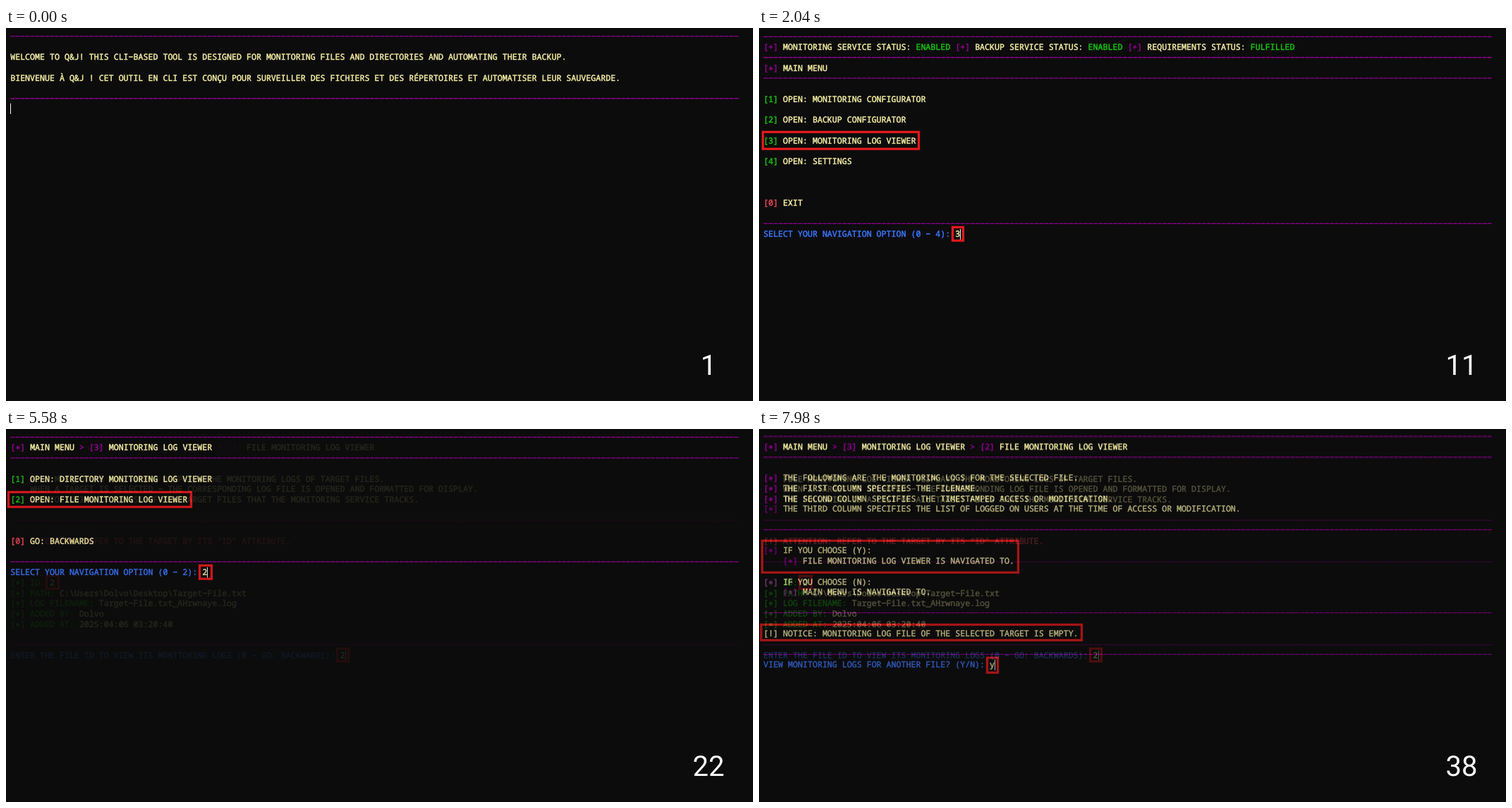
An HTML page that plays this animation: 1059x529 px, repeating every 8000 ms.

```html
<!DOCTYPE html>
<html lang="en">
<head>
<meta charset="utf-8">
<title>Terminal walkthrough</title>
<style>
  html, body { margin: 0; width: 100%; height: 100%; overflow: hidden; background: #0c0c0c; }
  svg { display: block; width: 1059px; height: 529px; }
  text { white-space: pre; text-rendering: geometricPrecision; }
  .row { font: 500 11.64px "Noto Sans Mono", "DejaVu Sans Mono", monospace; stroke-width: .45; }
  .rule { stroke: #920092; stroke-width: 1.3; stroke-dasharray: 6.1 .88; }
  .box { fill: none; stroke: #e3191b; stroke-width: 3.3; }
  .caret { fill: #f2f2f2; }
  #counter { font: 40px Roboto, Arial, sans-serif; fill: #fff; text-anchor: middle; }
</style>
</head>
<body>
<svg id="stage" viewBox="0 0 1059 529"></svg>
<script>
const LEFT = 6.2, COLUMN = 6.98, ROW = 14.73, WIDTH = 148 * COLUMN;
const HOLD = 1500, STEP = 60, STEPS = 10, SLIDE = HOLD + (STEPS - 1) * STEP, LOOP = 8000;
const COLORS = { y: '#f9f1a5', p: '#920092', g: '#16c60c', r: '#e74856', b: '#3b78ff' };

// Rows: '-' is a rule, '|' starts a span led by its colour letter, a final '^' is the caret.
// Boxes: left, top, right, bottom of the outer edge.
const scenes = [
  {
    top: 11.6,
    rows: ['-', '',
      'yWELCOME TO Q&J! THIS CLI-BASED TOOL IS DESIGNED FOR MONITORING FILES AND DIRECTORIES AND AUTOMATING THEIR BACKUP.', '',
      'yBIENVENUE À Q&J ! CET OUTIL EN CLI EST CONÇU POUR SURVEILLER DES FICHIERS ET DES RÉPERTOIRES ET AUTOMATISER LEUR SAUVEGARDE.', '',
      '-', 'y^'],
    boxes: []
  },
  {
    top: 12.3,
    rows: ['-',
      'p[+] |yMONITORING SERVICE STATUS: |gENABLED |p[+] |yBACKUP SERVICE STATUS: |gENABLED |p[+] |yREQUIREMENTS STATUS: |gFULFILLED',
      '-', 'p[*] |yMAIN MENU', '-', '',
      'g[1] |yOPEN: MONITORING CONFIGURATOR', '',
      'g[2] |yOPEN: BACKUP CONFIGURATOR', '',
      'g[3] |yOPEN: MONITORING LOG VIEWER', '',
      'g[4] |yOPEN: SETTINGS', '', '', '',
      'r[0] |yEXIT', '', '-',
      'bSELECT YOUR NAVIGATION OPTION (0 - 4): |y3^'],
    boxes: [[4, 146, 228, 173], [273, 281, 291, 303]]
  },
  {
    top: 11.6,
    rows: ['-', 'p[*] |yMAIN MENU |p> [3] |yMONITORING LOG VIEWER', '-', '',
      'g[1] |yOPEN: DIRECTORY MONITORING LOG VIEWER', '',
      'g[2] |yOPEN: FILE MONITORING LOG VIEWER', '', '', '',
      'r[0] |yGO: BACKWARDS', '', '-',
      'bSELECT YOUR NAVIGATION OPTION (0 - 2): |y2^'],
    boxes: [[2, 88, 264, 112], [273, 192, 293, 214]]
  },
  {
    top: 11.6,
    rows: ['-', 'p[*] |yMAIN MENU |p> [3] |yMONITORING LOG VIEWER |p> [2] |yFILE MONITORING LOG VIEWER', '-', '',
      'p[*] |yFILE MONITORING LOG VIEWER DISPLAYS THE MONITORING LOGS OF TARGET FILES.',
      'p[*] |yWHEN A TARGET IS SELECTED - THE CORRESPONDING LOG FILE IS OPENED AND FORMATTED FOR DISPLAY.',
      'p[*] |yTHE FOLLOWING IS A LIST OF ALL TARGET FILES THAT THE MONITORING SERVICE TRACKS.', '',
      '-', '', 'r[!] ATTENTION: REFER TO THE TARGET BY ITS "ID" ATTRIBUTE.', '', '-', '',
      'g[*] ID: |y2',
      'g[*] PATH: |yC:\\Users\\Dolvo\\Desktop\\Target-File.txt',
      'g[*] LOG FILENAME: |yTarget-File.txt_AHrwnaye.log',
      'g[*] ADDED BY: |yDolvo',
      'g[*] ADDED AT: |y2025:04:06 03:20:40', '', '-',
      'bENTER THE FILE ID TO VIEW ITS MONITORING LOGS (0 - GO: BACKWARDS): |y2^'],
    boxes: [[56, 207, 76, 228], [468, 310, 487, 331]]
  },
  {
    top: 10.2,
    rows: ['-', 'p[*] |yMAIN MENU |p> [3] |yMONITORING LOG VIEWER |p> [2] |yFILE MONITORING LOG VIEWER', '-', '',
      'p[*] |yTHE FOLLOWING ARE THE MONITORING LOGS FOR THE SELECTED FILE.',
      'p[*] |yTHE FIRST COLUMN SPECIFIES THE FILENAME.',
      'p[*] |yTHE SECOND COLUMN SPECIFIES THE TIMESTAMPED ACCESS OR MODIFICATION.',
      'p[*] |yTHE THIRD COLUMN SPECIFIES THE LIST OF LOGGED ON USERS AT THE TIME OF ACCESS OR MODIFICATION.', '',
      '-', '', 'p[*] |yIF YOU CHOOSE (Y):', 'p    [*] |yFILE MONITORING LOG VIEWER IS NAVIGATED TO.', '',
      'p[*] |yIF YOU CHOOSE (N):', 'p    [*] |yMAIN MENU IS NAVIGATED TO.', '', '-', '',
      'y[!] NOTICE: MONITORING LOG FILE OF THE SELECTED TARGET IS EMPTY.', '', '-',
      'bVIEW MONITORING LOGS FOR ANOTHER FILE? (Y/N): |yy^'],
    boxes: [[3, 157, 369, 205], [1.5, 276, 459, 301], [322, 323, 340, 347]]
  }
];

function add(parent, tag, attributes, content = '') {
  const node = document.createElementNS('http://www.w3.org/2000/svg', tag);
  for (const name in attributes) node.setAttribute(name, attributes[name]);
  node.textContent = content;
  return parent.appendChild(node);
}

// Wide dashes and vertically centred asterisks, as terminal fonts draw them.
const terminalGlyphs = text => text.replaceAll('-', '−').replaceAll('*', '∗');

function drawRow(group, row, y) {
  if (!row) return;
  if (row === '-') {
    add(group, 'line', { class: 'rule', x1: LEFT + .2, x2: LEFT + WIDTH, y1: y, y2: y });
    return;
  }
  const line = add(group, 'text', { class: 'row', x: LEFT, y: y + 4.15 });
  let column = 0;
  for (const span of row.replace('^', '').split('|')) {
    const color = COLORS[span[0]];
    add(line, 'tspan', { fill: color, stroke: color }, terminalGlyphs(span.slice(1)));
    column += span.length - 1;
  }
  if (row.endsWith('^')) {
    add(group, 'rect', { class: 'caret', x: Math.round(LEFT + column * COLUMN), y: Math.round(y - 7.4), width: 1, height: 15 });
  }
}

function drawScene({ top, rows, boxes }) {
  const group = add(stage, 'g', {});
  add(group, 'rect', { width: 1059, height: 529, fill: '#0c0c0c' });
  rows.forEach((row, i) => drawRow(group, row, top + i * ROW));
  for (const [l, t, r, b] of boxes) {
    add(group, 'rect', { class: 'box', x: l + 1.5, y: t + 1.5, width: r - l - 3, height: b - t - 3 });
  }
  return group;
}

const stage = document.getElementById('stage');
const layers = scenes.map(drawScene);
const counter = add(stage, 'text', { id: 'counter', x: 996, y: 492 });
const start = performance.now();

function render() {
  const time = (performance.now() - start) % LOOP;
  const current = Math.floor(time / SLIDE);
  const step = Math.max(0, Math.floor((time % SLIDE - HOLD) / STEP) + 1);
  layers.forEach((layer, i) => {
    layer.style.opacity = i === current ? 1 : i === current + 1 ? step / STEPS : 0;
  });
  counter.textContent = 1 + current * STEPS + step;
  requestAnimationFrame(render);
}
render();
</script>
</body>
</html>
```
